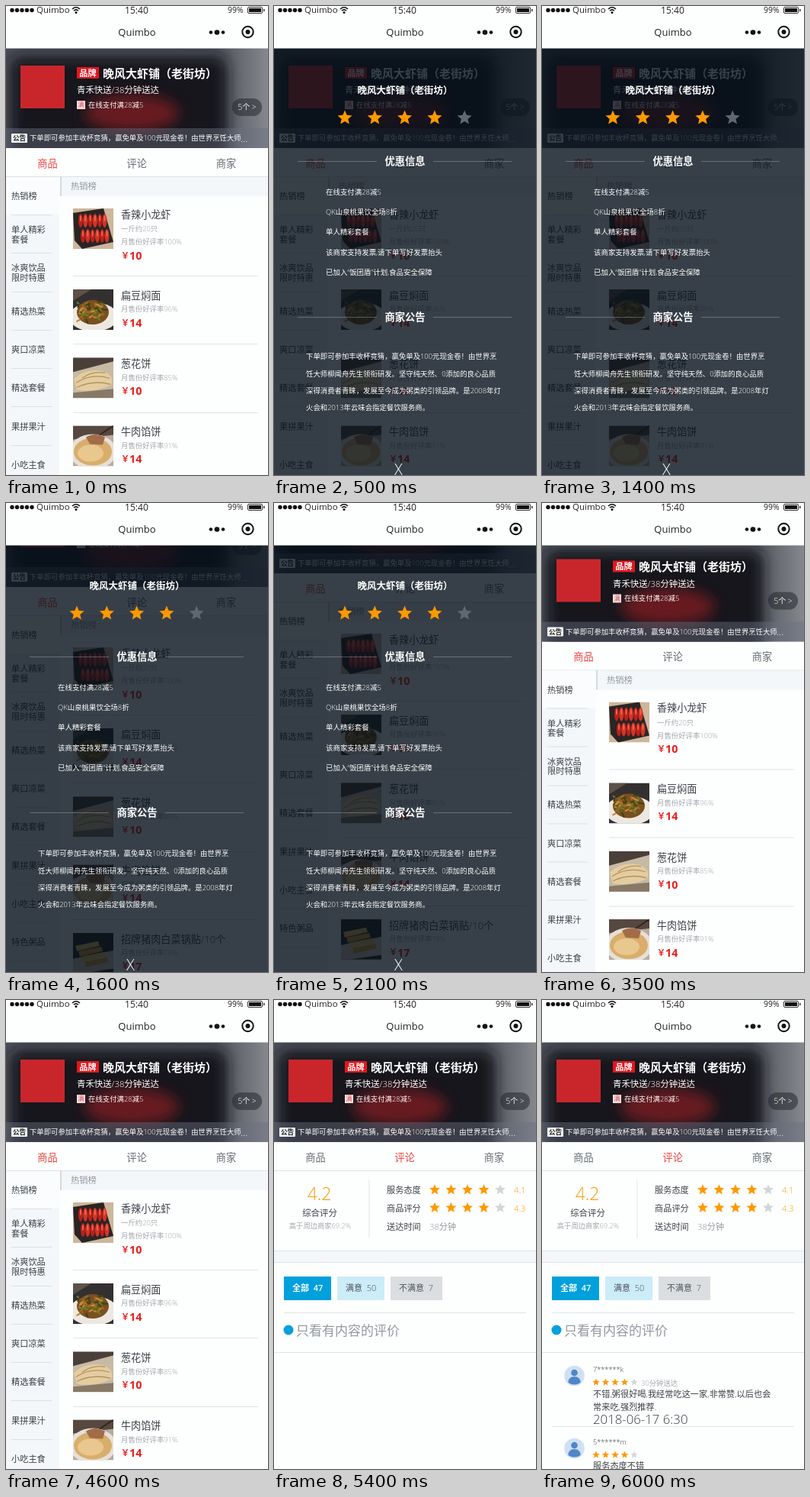
Write an HTML page that moves like this. It is 344 px wide and 614 px high and loops after 8000 ms.

```html
<!DOCTYPE html>
<html lang="zh-CN">
<head>
<meta charset="utf-8">
<title>点餐小程序</title>
<style>
html, body { margin: 0; width: 100%; height: 100%; overflow: hidden; background: #fdfefe; }
svg { display: block; width: 344px; height: 614px; }
text { font-family: "Open Sans", "Noto Sans CJK SC", "Noto Sans CJK", sans-serif; white-space: pre; }
</style>
</head>
<body>
<svg id="stage" viewBox="0 0 344 614" xmlns="http://www.w3.org/2000/svg"></svg>
<script>
const LOOP = 8000;
const INK = '#3c4146', MUTED = '#a3a8ad', RULE = '#e0e4e8', PALE = '#f3f7fa';
const RED = '#ec1c1c', TAB_RED = '#e9443f', GOLD = '#ff9900', BLUE = '#00a0dc';

const SHOP = '晚风大虾铺（老街坊）', APP = 'Quimbo';
const NOTICE = '下单即可参加丰收杯竞猜，赢免单及100元现金卷！由世界烹';

// y is the vertical middle of the text
const text = (s, x, y, size, fill = INK, o = {}) =>
  `<text x="${x}" y="${y + size * 0.37}" font-size="${size}" fill="${fill}" font-weight="${o.w || 300}" text-anchor="${o.a || 'start'}">${s}</text>`;
const mid = (s, x, y, size, fill, w) => text(s, x, y, size, fill, { a: 'middle', w });
const rect = (x, y, w, h, fill, more = '') =>
  `<rect x="${x}" y="${y}" width="${w}" height="${h}" fill="${fill}" ${more}/>`;
const dot = (x, y, r, fill, more = '') => `<circle cx="${x}" cy="${y}" r="${r}" fill="${fill}" ${more}/>`;
const oval = (x, y, rx, ry, fill, more = '') =>
  `<ellipse cx="${x}" cy="${y}" rx="${rx}" ry="${ry}" fill="${fill}" ${more}/>`;
const path = (d, fill, more = '') => `<path d="${d}" fill="${fill}" ${more}/>`;
const hline = (x1, x2, y, fill = RULE) => rect(x1, y, x2 - x1, 1, fill);
const group = (id, body) => `<g id="${id}">${body}</g>`;
const times = (n, f) => Array.from({ length: n }, (_, i) => f(i)).join('');

function star(x, y, r, fill) {
  let pts = '';
  for (let i = 0; i < 10; i++) {
    const a = (i / 5 - 0.5) * Math.PI, d = i % 2 ? r * 0.45 : r;
    pts += `${(x + d * Math.cos(a)).toFixed(2)},${(y + d * Math.sin(a)).toFixed(2)} `;
  }
  return `<polygon points="${pts}" fill="${fill}"/>`;
}
const stars = (x, y, r, gap, off = '#d3d6d9') =>
  times(5, i => star(x + i * gap, y, r, i < 4 ? GOLD : off));

function random(seed) {
  return () => (seed = (seed * 16807) % 2147483647) / 2147483647;
}

// Dishes, each painted in a 53 x 53 box
const dishes = [
  () => rect(0, 0, 53, 53, '#cdb69c') +
    path('M0 6L40 0L53 44L12 53L2 42Z', '#2a2524') +
    times(12, i => {
      const x = 10 + (i % 6) * 6.3, y = i < 6 ? 16 : 36;
      return oval(x + (i < 6 ? 0 : 3), y, 3, 9, i % 2 ? '#d63226' : '#bd2019') +
        oval(x + (i < 6 ? 0 : 3), y - 3, 1, 4, '#f0674f');
    }),
  () => {
    const rnd = random(77);
    return rect(0, 0, 53, 53, '#33302f') + path('M0 0H24L0 15Z', '#5d5248') +
      oval(27, 36, 32, 19, '#ece8e1') + oval(26, 30, 21, 16, '#79501f') +
      times(44, i => {
        const x = 8 + rnd() * 30, y = 16 + rnd() * 24, dx = rnd() * 14 - 5, dy = rnd() * 10 - 5;
        const c = ['#6d7a25', '#9a6a24', '#43401a', '#c88b3a'][i % 4];
        return path(`M${x} ${y}l${dx} ${dy}`, 'none', `stroke="${c}" stroke-width="2.2" stroke-linecap="round"`);
      });
  },
  () => rect(0, 0, 53, 53, '#4a4039') + path('M0 19L53 5V53H0Z', '#c7b9a4') +
    path('M1 28Q16 13 40 18Q55 24 50 36Q26 47 5 42Z', '#e3cda0') +
    path('M4 33Q24 20 48 27M5 39Q27 29 49 35M12 27Q25 17 42 20', 'none', 'stroke="#b6935c" stroke-width="1.3"') +
    path('M0 46L53 41V53H0Z', '#887866'),
  () => rect(0, 0, 53, 53, '#b9aa9b') + path('M0 0H53V12L0 18Z', '#57483f') +
    oval(26, 34, 31, 23, '#e5e0d9') + oval(26, 34, 25, 18, '#d9ad6b') +
    oval(23, 36, 17, 11, '#e8c88f') + path('M17 15Q28 8 42 15L39 25L22 24Z', '#a36c48') +
    path('M35 12L53 0', 'none', 'stroke="#33251e" stroke-width="2"'),
  () => rect(0, 0, 53, 53, '#29231f') + path('M0 34L53 23V47L10 53H0Z', '#d8d0bf') +
    times(4, i => path(`M${3 + i * 4} ${17 + i * 7}L${33 + i * 4} ${11 + i * 7}L${35 + i * 4} ${17 + i * 7}L${5 + i * 4} ${24 + i * 7}Z`,
      i % 2 ? '#d99a36' : '#efc45f'))
];

function header() {
  return rect(0, 0, 344, 55.5, '#fdfefe') +
    times(5, i => dot(8 + i * 6.5, 5.5, 2.7, '#111')) +
    text(APP, 40, 5, 11.5, '#222', { w: 400 }) +
    path('M87 4Q92 -.5 97 4M89 6.2Q92 3.6 95 6.2', 'none', 'stroke="#111" stroke-width="1.6"') + dot(92, 8.4, 1.5, '#111') +
    mid('15:40', 171.5, 5, 12.2, '#222', 400) +
    text('99%', 291, 5.5, 10.4, '#222', { w: 400 }) +
    rect(317.5, 1.5, 19, 8, 'none', 'rx="1.5" stroke="#333"') + rect(319, 3, 16, 5, '#111') + rect(338, 4, 1.5, 3, '#333') +
    mid(APP, 172, 34.5, 13, '#222', 400) +
    dot(269, 34.5, 2.3, '#111') + dot(277, 34.5, 3.3, '#111') + dot(285, 34.5, 2.3, '#111') +
    dot(317.5, 34, 7.2, 'none', 'stroke="#111" stroke-width="2"') + dot(317.5, 34, 3, '#111');
}

function banner() {
  return `<g clip-path="url(#bannerClip)">` +
    rect(0, 55, 344, 132, 'url(#bannerTone)') +
    rect(6, 66, 284, 140, '#16191f', 'rx="14" filter="url(#soft)"') +
    oval(165, 140, 62, 24, '#7d1a23', 'filter="url(#soft)" opacity=".8"') +
    `</g>` +
    rect(19, 78, 58, 56, '#c9262c') +
    rect(93, 80, 29, 15, '#e3161d') + mid('品牌', 107.5, 87.5, 11.2, '#fff', 700) +
    text(SHOP, 127, 88, 15, '#fff', { w: 700 }) +
    text('青禾快送/38分钟送达', 93, 110, 11.4, '#fff') +
    rect(93, 124, 11, 11, '#f5dfe0') + mid('满', 98.5, 129.5, 8, '#d84a4f') +
    text('在线支付满28减5', 108, 129.5, 9.4, '#fff') +
    rect(297, 121, 39, 23, '#25282e', 'rx="11.5" opacity=".55"') + text('5个 &gt;', 304.5, 132.5, 10, '#fff') +
    rect(0, 160, 344, 26, '#697080', 'opacity=".45"') +
    rect(7, 167, 21, 12, '#f5f6f7', 'rx="1"') + mid('公告', 17.5, 173, 8.6, '#222', 700) +
    text(NOTICE + '饪大师', 31, 173, 9.35, '#fff') + text('...', 308, 173, 13, '#fff');
}

function tabs() {
  const names = ['商品', '评论', '商家'];
  return names.map((s, i) => `<g class="tab">${mid(s, 54.5 + i * 117.2, 206, 13.2, '')}</g>`).join('') +
    hline(0, 344, 223, '#dde1e5');
}

function goods() {
  const menu = ['热销榜', '单人精彩/套餐', '冰爽饮品/限时特惠', '精选热菜', '爽口凉菜', '精选套餐', '果拼果汁', '小吃主食', '特色粥品'];
  const list = [['香辣小龙虾', 100, 10], ['扁豆焖面', 96, 14], ['葱花饼', 85, 10], ['牛肉馅饼', 91, 14], ['招牌猪肉白菜锅贴/10个', 78, 17]];
  const left = menu.map((s, i) => {
    const y = 249 + i * 50.25, parts = s.split('/');
    return parts.map((p, k) => text(p, 7, y + (k - (parts.length - 1) / 2) * 12.6, 11.2)).join('') +
      hline(7, 60, Math.round(y + 24), '#dbe0e4');
  }).join('');
  const right = list.map(([name, rate, price], i) => {
    const y = i ? 371 + (i - 1) * 89.25 : 265, low = i ? 0 : 18;
    return `<svg x="88" y="${y}" width="53" height="53">${dishes[i]()}</svg>` +
      text(name, 151, y + 8, 13.1) +
      (i ? '' : text('一斤约20只', 151, y + 27, 9.4, MUTED)) +
      text(`月售份好评率${rate}%`, 151, y + 26 + low, 9.4, MUTED) +
      text('￥', 151, y + 43.5 + low, 11, RED, { w: 700 }) +
      text(price, 162, y + 43.5 + low, 14.3, RED, { w: 700 }) +
      (i < 4 ? hline(88, 331, Math.round(353 + i * 89.25)) : '');
  }).join('');
  return rect(0, 224, 70, 490, PALE) + rect(0, 224, 70, 49, '#fafcfd') + left +
    rect(71, 224, 273, 25, PALE) + rect(71, 224, 2, 25, '#d3d9de') + text('热销榜', 85, 236, 11.3, '#93999f') + right;
}

function ratings() {
  const row = (s, y, score) => text(s, 148, y, 11.2) + stars(211, y - 0.5, 7.3, 21.5) + text(score, 315, y, 11.2, GOLD);
  const pill = (s, x, w, bg, fg, weight) => rect(x, 362, w, 31, bg) + text(s, x + 11, 377, 11, fg, { w: weight });
  return mid('4.2', 59.5, 253, 23, GOLD) + mid('综合评分', 60, 279, 11.4) +
    mid('高于周边商家69.2%', 60.5, 296, 9.3, MUTED) +
    rect(124.5, 235, 1, 76, RULE) +
    row('服务态度', 249, '4.1') + row('商品评分', 272.5, '4.3') +
    text('送达时间', 148, 296.5, 11.2) + text('38分钟', 204, 296.5, 11.2, '#93999f') +
    rect(0, 328, 344, 16, PALE) + hline(0, 344, 328) + hline(0, 344, 343) +
    pill('全部  47', 13, 62, BLUE, '#fff', 600) + pill('满意  50', 83, 62, '#ccecf8', '#4d555d') +
    pill('不满意  7', 153, 68, '#dbdee0', '#4d555d') +
    hline(13, 331, 409) + dot(19, 432, 6.5, BLUE) + text('只看有内容的评价', 29, 432.5, 17, '#93999f') +
    hline(0, 344, 461);
}

function comments() {
  const head = (name, y) =>
    `<svg x="29" y="${y - 13.5}" width="27" height="27" viewBox="-13.5 -13.5 27 27">` +
    dot(0, 0, 13.3, '#cfe0f3') + dot(0, -4, 4.3, '#4f86c6') + path('M-8 9Q-8 1 0 1Q8 1 8 9Q0 14 -8 9Z', '#4f86c6') + `</svg>` +
    text(name, 67, y - 8, 9.2) + stars(71, y + 8.5, 5, 12.5);
  return head('7******k', 492) + text('30分钟送达', 130, 501.5, 9.4, MUTED) +
    text('不错,粥很好喝,我经常吃这一家,非常赞,以后也会', 67, 516, 11.2) +
    text('常来吃,强烈推荐.', 67, 532.5, 11.2) +
    text('2018-06-17 6:30', 67, 549, 16.8) + hline(13, 331, 558) +
    head('5******m', 587) + text('服务态度不错', 67, 610, 11.2);
}

function overlay() {
  const white = '#fff';
  const section = (s, y) => mid(s, 172, y, 13.3, white, 700) +
    rect(31, y, 104, 1, white, 'opacity=".25"') + rect(209, y, 103, 1, white, 'opacity=".25"');
  const offers = ['在线支付满28减5', 'QK山泉桃果饮全场8折', '单人精彩套餐', '该商家支持发票,请下单写好发票抬头', '已加入“饭团盾”计划,食品安全保障'];
  const story = [NOTICE, '饪大师柳闻舟先生领衔研发。坚守纯天然、0添加的良心品质',
    '深得消费者青睐，发展至今成为粥类的引领品牌。是2008年灯', '火会和2013年云味会指定餐饮服务商。'];
  return rect(0, 55, 344, 559, 'rgb(7,17,27)', 'opacity=".8"') +
    group('panel', mid(SHOP, 172, 108, 12.5, white, 700) + stars(93, 144.5, 10, 39.3, '#5f6870') +
      section('优惠信息', 201) + offers.map((s, i) => text(s, 68, 241.5 + i * 26.2, 9.45, white)).join('') +
      section('商家公告', 405) + mid('X', 163.5, 605, 20, white)) +
    story.map((s, i) => text(s, 42, 459 + i * 22.3, 9.4, white)).join('');
}

const stage = document.getElementById('stage');
stage.innerHTML = `<defs>
  <clipPath id="bannerClip"><rect x="0" y="55" width="344" height="131"/></clipPath>
  <filter id="soft" x="-30%" y="-60%" width="160%" height="220%"><feGaussianBlur stdDeviation="9"/></filter>
  <linearGradient id="bannerTone"><stop offset="0" stop-color="#4b5059"/><stop offset=".8" stop-color="#4c5058"/><stop offset="1" stop-color="#85888d"/></linearGradient>
</defs>` + rect(0, 0, 344, 614, '#fdfefe') +
  group('page', banner() + tabs() + group('goods', goods()) + group('ratings', ratings() + group('comments', comments()))) +
  group('overlay', overlay()) + header();

const el = id => document.getElementById(id);
const tabEls = [...document.querySelectorAll('.tab text')];
const show = (id, on) => el(id).setAttribute('display', on ? 'inline' : 'none');

const steps = [
  { at: 0, scroll: 0 },
  { at: 500, scroll: 0, open: true, drop: 2 },
  { at: 1500, scroll: 32, open: true, drop: 1 },
  { at: 1600, scroll: 76, open: true },
  { at: 1700, scroll: 94, open: true },
  { at: 2800, scroll: 94 },
  { at: 3400, scroll: 48 },
  { at: 3500, scroll: 4.5 },
  { at: 3600, scroll: 0 },
  { at: 5400, scroll: 0, tab: 1 },
  { at: 6000, scroll: 0, tab: 1, loaded: true }
];

let current;
function draw(now) {
  const t = now % LOOP;
  const s = steps.filter(k => k.at <= t).pop();
  if (s !== current) {
    current = s;
    const tab = s.tab || 0;
    el('page').setAttribute('transform', `translate(0 ${-s.scroll})`);
    el('panel').setAttribute('transform', `translate(0 ${s.drop || 0})`);
    show('overlay', s.open);
    show('goods', tab === 0);
    show('ratings', tab === 1);
    show('comments', s.loaded);
    tabEls.forEach((e, i) => e.setAttribute('fill', i === tab ? TAB_RED : '#666c72'));
  }
}
const start = performance.now();
function tick() {
  draw(performance.now() - start);
  requestAnimationFrame(tick);
}
draw(0);
requestAnimationFrame(tick);
</script>
</body>
</html>
```
